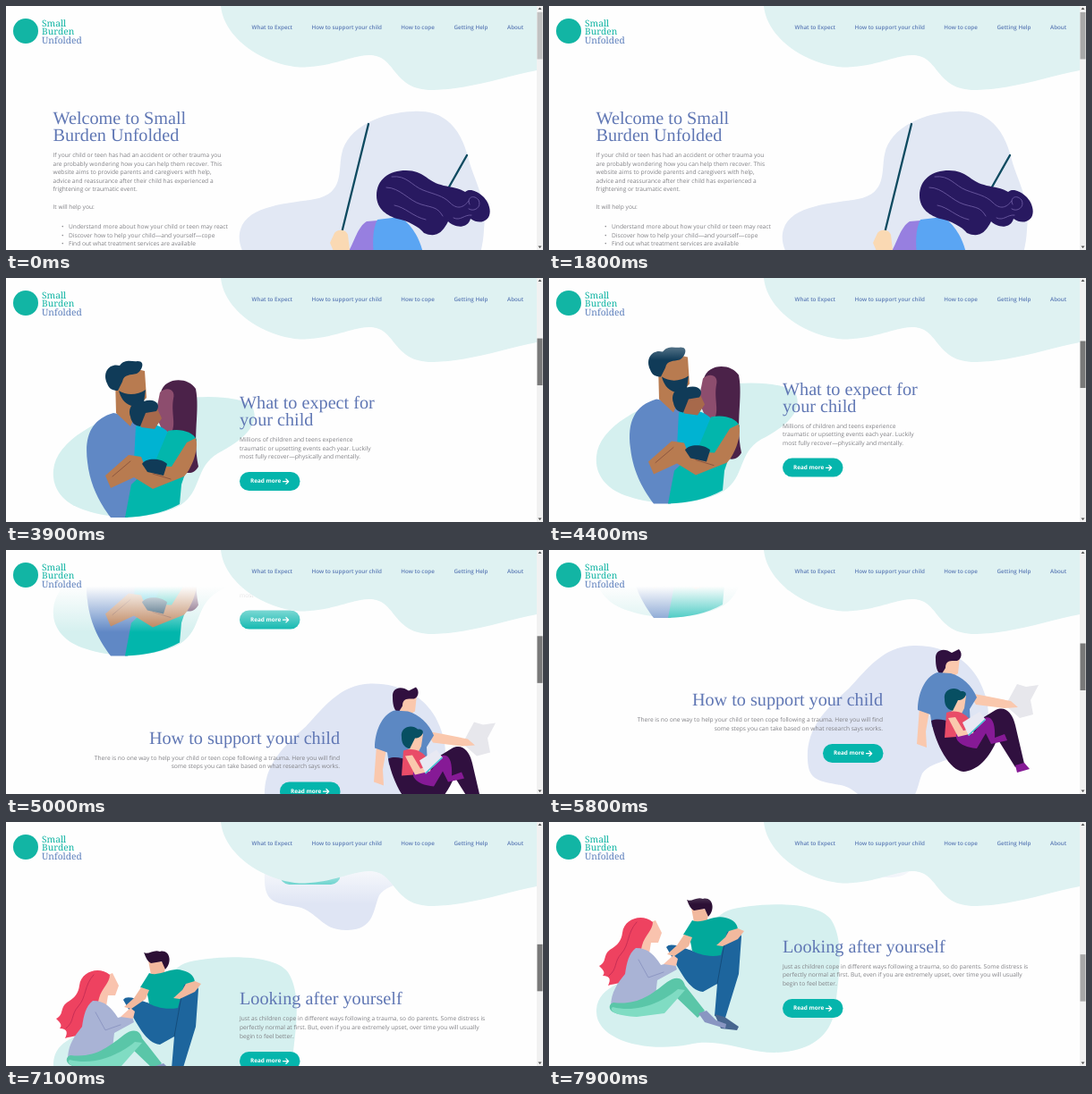
Write an HTML page that moves like this. It is 600 px wide and 273 px high and loops after 8 s.

```html
<!DOCTYPE html>
<html lang="en">
<head>
<meta charset="utf-8">
<title>Scrolling through a support site</title>
<style>
  html, body { margin: 0; width: 100%; height: 100%; overflow: hidden; background: #fefefe; }
  svg { display: block; width: 600px; height: 273px; text-rendering: geometricPrecision; }
  text { font: 6.63px "Open Sans", sans-serif; fill: #808085; }
  .nav { font-size: 6.28px; font-weight: 600; fill: #5c7bb6; }
  .title { font: 20.2px "Liberation Serif", serif; fill: #6077b4; }
  .brand { font: 10.2px "Noto Serif", serif; fill: #12b5a4; }
  .label { font-size: 6.4px; font-weight: 700; fill: #fff; }
  .end { text-anchor: end; }
  .line { fill: none; stroke-linecap: round; stroke-linejoin: round; }
</style>
</head>
<body>
<svg viewBox="0 0 600 273">
  <defs>
    <linearGradient id="fade" x2="0" y2="1">
      <stop offset=".44" stop-color="#fefefe"/>
      <stop offset="1" stop-color="#fefefe" stop-opacity="0"/>
    </linearGradient>
    <g id="button">
      <rect width="67.5" height="21" rx="10.5" fill="#05b5ac"/>
      <text class="label" x="12" y="12.4">Read more</text>
      <path class="line" d="M49 10.7h6M52.4 8l2.8 2.7-2.8 2.7" transform="translate(-.5)" stroke="#fff" stroke-width="1.2"/>
    </g>
  </defs>

  <g id="page">
    <g id="welcome">
      <path fill="#e2e8f4" d="M455 118C490 116 507 136 516 168C522 194 538 215 534 250C532 300 500 345 440 344C390 344 360 318 310 308C270 298 256 268 262 250C270 222 318 221 345 216C378 210 371 184 375 166C381 135 420 119 455 118Z"/>
      <path class="line" stroke="#0d4a60" stroke-width="2.3" d="M405 132L375 254L370 310M515 167L493 206"/>
      <path fill="#977fe0" d="M403 241C393 247 390 262 381 278L392 293L420 275L428 239Z"/>
      <path fill="#5aa5f3" d="M415 239C407 255 410 280 416 305H468C470 280 462 250 440 236Z"/>
      <path fill="#fad9b3" d="M367 254C371 249 380 250 382 256L384 273L394 285L385 294L368 279L362 265Z"/>
      <path fill="#2b1a61" d="M396 305H470L474 326H388Z"/>
      <path fill="#281960" d="M414 212C414 194 428 184 447 184C467 184 470 196 486 200C495 203 506 203 513 208C520 201 538 213 540 225C544 240 530 246 519 238C515 251 500 247 494 241C488 253 481 260 467 254C462 247 448 240 437 238C427 235 414 228 414 212Z"/>
      <path class="line" stroke="#6c5ba2" stroke-width=".9" d="M431 191C448 189 453 201 466 206S488 212 496 220S511 226 517 218M425 203C440 203 450 218 464 222S482 225 488 235M434 223C446 225 455 236 469 239M518 222C514 215 522 210 528 217C532 225 523 231 517 227M500 237C508 241 512 233 520 234"/>
    </g>

    <g id="expect" transform="translate(0 315)">
      <path fill="#d5f0ef" d="M53 215C56 182 102 157 160 141C205 130 265 129 276 146C285 168 256 186 237 196C211 211 219 239 195 254C172 268 124 272 89 260C66 253 51 237 53 215Z"/>
      <path fill="#6088c5" d="M120 151C96 158 87 176 91 206C94 234 107 255 117 268H136L174 200L157 158Z"/>
      <path fill="#b87b50" d="M122 112L123 151L139 166L151 140L157 134L155 104L134 99Z"/>
      <path fill="#103b58" d="M113 118C107 105 116 95 127 98C133 90 141 94 147 93C157 93 151 105 146 107C139 109 132 107 130 116L125 126C119 126 115 124 113 118ZM126 126C135 132 147 131 156 125L154 139L140 143C132 140 128 134 126 126Z"/>
      <path fill="#4b2249" d="M173 128C177 111 203 110 212 124C217 149 208 176 215 211C208 223 195 219 190 205L181 175Z"/>
      <path fill="#8d4d6e" d="M172 128C179 121 190 124 187 135C184 151 191 165 184 174L174 169L167 153Z"/>
      <path fill="#00b3d2" d="M145 166C154 161 174 163 181 173L172 207L143 205Z"/>
      <path fill="#a7694b" d="M143 149L168 144L174 157L166 169L151 167Z"/>
      <path fill="#103b58" d="M139 155C135 143 145 136 154 138C166 134 174 141 168 149L156 151L150 166C143 165 140 161 139 155Z"/>
      <path fill="#02b6ac" d="M181 171C195 168 209 172 213 181L196 231L194 253C176 263 156 267 133 268L140 231L166 207Z"/>
      <path fill="#b87b50" d="M212 179C216 192 207 214 199 222L164 236L143 223L117 235L111 221L137 198L151 200L155 210L185 211L202 184Z"/>
      <path fill="#103b58" d="M152 208C156 201 173 201 180 208L176 221L158 217Z"/>
      <path class="line" stroke="#8d5740" stroke-width="1" d="M119 222L139 205M164 219L184 225"/>
      <use href="#button" x="261" y="217"/>
    </g>

    <g id="support" transform="translate(0 507)">
      <path fill="#dfe5f4" d="M289 235C287 200 308 179 335 155C355 134 373 108 407 107C440 106 467 121 480 145C493 170 496 195 480 214C462 236 428 234 417 250C410 266 412 288 382 289C352 290 349 268 326 263C302 259 290 258 289 235Z"/>
      <path fill="#e7e7ec" d="M523 150L533 153L547 151L538 168L541 184L526 188L510 174Z"/>
      <path fill="#fac8ad" d="M440 119L459 119L457 138L449 143L437 140ZM414 176L425 180L421 203L422 221L411 217ZM469 160L486 163L516 169L524 176L509 177L477 173Z"/>
      <path fill="#30103f" d="M432 122C431 111 442 109 450 115L458 111C463 116 460 123 456 124C449 124 443 123 443 132L438 140C433 136 432 129 432 122Z"/>
      <path fill="#5c88c3" d="M434 137C419 142 412 162 412 179L426 184L428 198L471 198L470 178L478 165C473 152 461 141 449 138Z"/>
      <path fill="#30103f" d="M427 191C440 186 452 196 468 198L499 179C511 174 518 183 521 196L531 239L521 243L501 211C492 234 478 247 463 248C448 247 432 218 427 191Z"/>
      <path fill="#861a96" d="M521 241L531 238L537 245L523 249Z"/>
      <path fill="#fac8ad" d="M448 164L466 163L464 177L460 185L450 183Z"/>
      <path fill="#074f62" d="M442 167C440 155 454 152 460 158C470 157 466 168 457 168L451 180C444 178 442 173 442 167Z"/>
      <path fill="#e94c68" d="M444 182C455 178 467 183 471 192L469 208L442 210Z"/>
      <path fill="#861a96" d="M455 206C461 196 470 206 476 203L486 188C494 185 499 192 498 210L509 206L512 213L494 217L488 205L478 222C465 221 453 215 455 206Z"/>
      <path fill="#fac8ad" d="M446 188L454 187L463 202L475 199L474 205L457 209Z"/>
      <path fill="#e8e9f3" d="M462 193L481 181L488 190L469 208Z"/>
      <path class="line" stroke="#3cbfd0" stroke-width="1.4" d="M469 207L487 190"/>
      <use href="#button" x="306" y="217"/>
    </g>

    <g id="selfcare" transform="translate(0 734)">
      <path fill="#d5f0ef" d="M53 210C55 182 89 177 124 163C172 145 170 113 200 99C225 91 298 86 315 109C330 132 324 170 321 198C319 240 292 257 252 258C218 258 191 241 156 249C110 258 51 245 53 210Z"/>
      <path fill="#f9c3ae" d="M103 117L119 110L126 124L122 135L114 135L112 147L99 145Z"/>
      <path fill="#ee4260" d="M82 124C84 108 104 102 116 112C116 121 107 127 104 138C101 150 99 162 92 172C84 182 74 180 66 183C69 177 69 172 60 172C64 168 59 164 56 161C65 157 60 149 68 143C77 138 81 132 82 124Z"/>
      <path class="line" stroke="#c82e55" stroke-width="1" d="M98 112C87 124 90 137 81 147S77 164 67 172"/>
      <path fill="#f2b99e" d="M159 96L179 98L177 109L172 118L162 112Z"/>
      <path fill="#2c1035" d="M154 87C159 90 165 83 172 86C182 83 187 97 178 106L174 97L162 99C158 97 156 92 154 87Z"/>
      <path fill="#1d659d" d="M131 140C137 132 154 145 180 149L193 126C198 118 213 119 215 128L212 170L197 219L185 217L188 181L172 190C156 188 148 169 131 140Z"/>
      <path class="line" stroke="#144d7c" stroke-width="1" d="M196 136L188 181"/>
      <path fill="#02a99b" d="M160 110C171 115 184 103 197 107C207 109 211 115 211 121L199 123L192 149C178 152 165 147 160 144L157 129L150 126Z"/>
      <path fill="#f2b99e" d="M151 126L160 129L156 139L140 150L132 148L143 138ZM201 122L211 119L218 122L211 131L194 139L187 138L197 129Z"/>
      <path fill="#47668f" d="M185 215L196 218L212 229L210 233L192 231Z"/>
      <path fill="#a9b3d5" d="M97 141C111 141 118 149 125 160L140 156L143 165L121 177L118 203L69 207C69 190 77 180 85 170C87 157 89 147 97 141Z"/>
      <path class="line" stroke="#8d97c3" stroke-width="1" d="M100 154L111 174L128 168"/>
      <path fill="#f9c3ae" d="M128 159L139 149L144 153L142 161Z"/>
      <path fill="#5ac6a8" d="M72 202C98 205 112 195 132 179C143 171 150 175 152 183L174 211L166 219L141 195C127 213 104 219 80 215C66 214 65 204 72 202Z"/>
      <path fill="#80dcc3" d="M71 207C99 214 126 202 144 187L152 188L129 214L98 218C77 217 66 212 71 207Z"/>
      <path fill="#8996c2" d="M167 214L176 211L187 222L198 226L197 231L174 224Z"/>
      <use href="#button" x="261" y="198"/>
    </g>
  </g>

  <rect width="593" height="92" fill="url(#fade)"/>
  <path fill="#dff2f2" d="M240 0C244 40 295 69 334 68.500C366 67 385 56 405 55C437 54 430 95 478 94C520 93 560 78 593 72V0Z"/>
  <g id="header"><circle cx="22" cy="28" r="14" fill="#12b5a4"/></g>

  <rect x="593" width="7" height="273" fill="#f1f1f1"/>
  <path fill="#505050" d="M594.500 4l2-2.500 2 2.500zM594.500 268.500l2 2.500 2-2.500z"/>
  <rect id="thumb" x="593.500" width="6" height="52.500"/>
</svg>
<script>
const $ = id => document.getElementById(id);

function write(group, x, y, style, rows, step = 9.6) {
  const lines = rows.map((row, i) => `<text class="${style}" x="${x}" y="${y + i * step}">${row}</text>`);
  $(group).insertAdjacentHTML('beforeend', lines.join(''));
}

write('welcome', 52.5, 131.6, 'title', ['Welcome to Small', 'Burden Unfolded'], 19.2);
write('welcome', 52.5, 169, '', [
  'If your child or teen has had an accident or other trauma you',
  'are probably wondering how you can help them recover. This',
  'website aims to provide parents and caregivers with help,',
  'advice and reassurance after their child has experienced a',
  'frightening or traumatic event.', '', 'It will help you:']);
write('welcome', 70, 249.2, '', [
  'Understand more about how your child or teen may react',
  'Discover how to help your child—and yourself—cope',
  'Find out what treatment services are available']);
write('welcome', 62, 249.2, '', ['•', '•', '•']);

write('expect', 261, 146.2, 'title', ['What to expect for', 'your child'], 19.2);
write('expect', 261, 183.1, '', [
  'Millions of children and teens experience',
  'traumatic or upsetting events each year. Luckily',
  'most fully recover—physically and mentally.']);

write('support', 373, 174, 'title end', ['How to support your child']);
write('support', 373, 192, 'end', [
  'There is no one way to help your child or teen cope following a trauma. Here you will find',
  'some steps you can take based on what research says works.']);

write('selfcare', 261, 145.5, 'title', ['Looking after yourself']);
write('selfcare', 261, 163.5, '', [
  'Just as children cope in different ways following a trauma, so do parents. Some distress is',
  'perfectly normal at first. But, even if you are extremely upset, over time you will usually',
  'begin to feel better.']);

write('header', 40, 22.5, 'brand', ['Small', 'Burden', '<tspan fill="#5a7dbb">Unfolded</tspan>']);
[[274.5, 'What to Expect'], [341.5, 'How to support your child'], [441.3, 'How to cope'],
 [500.5, 'Getting Help'], [560, 'About']].forEach(([x, name]) => write('header', x, 26.2, 'nav', [name]));

// Each drag of the scrollbar: start, end (ms), distance (px)
const drags = [[2700, 3800, 315], [4200, 5350, 192], [6000, 7650, 227]];

function ease(t, from, to) {
  const u = Math.min(1, Math.max(0, (t - from) / (to - from)));
  return u * u * (3 - 2 * u);
}

function draw(now) {
  const t = Math.floor(now % 8000 / 100) * 100;
  const scroll = drags.reduce((sum, [from, to, distance]) => sum + distance * ease(t, from, to), 0);
  const held = t >= 2800 && t < 7800;
  $('page').setAttribute('transform', `translate(0 ${-scroll.toFixed(1)})`);
  $('thumb').setAttribute('y', 7 + scroll / 5.2);
  $('thumb').setAttribute('fill', held ? '#787878' : t < 1400 ? '#c1c1c1' : '#a8a8a8');
  requestAnimationFrame(draw);
}
draw(performance.now());
</script>
</body>
</html>
```
